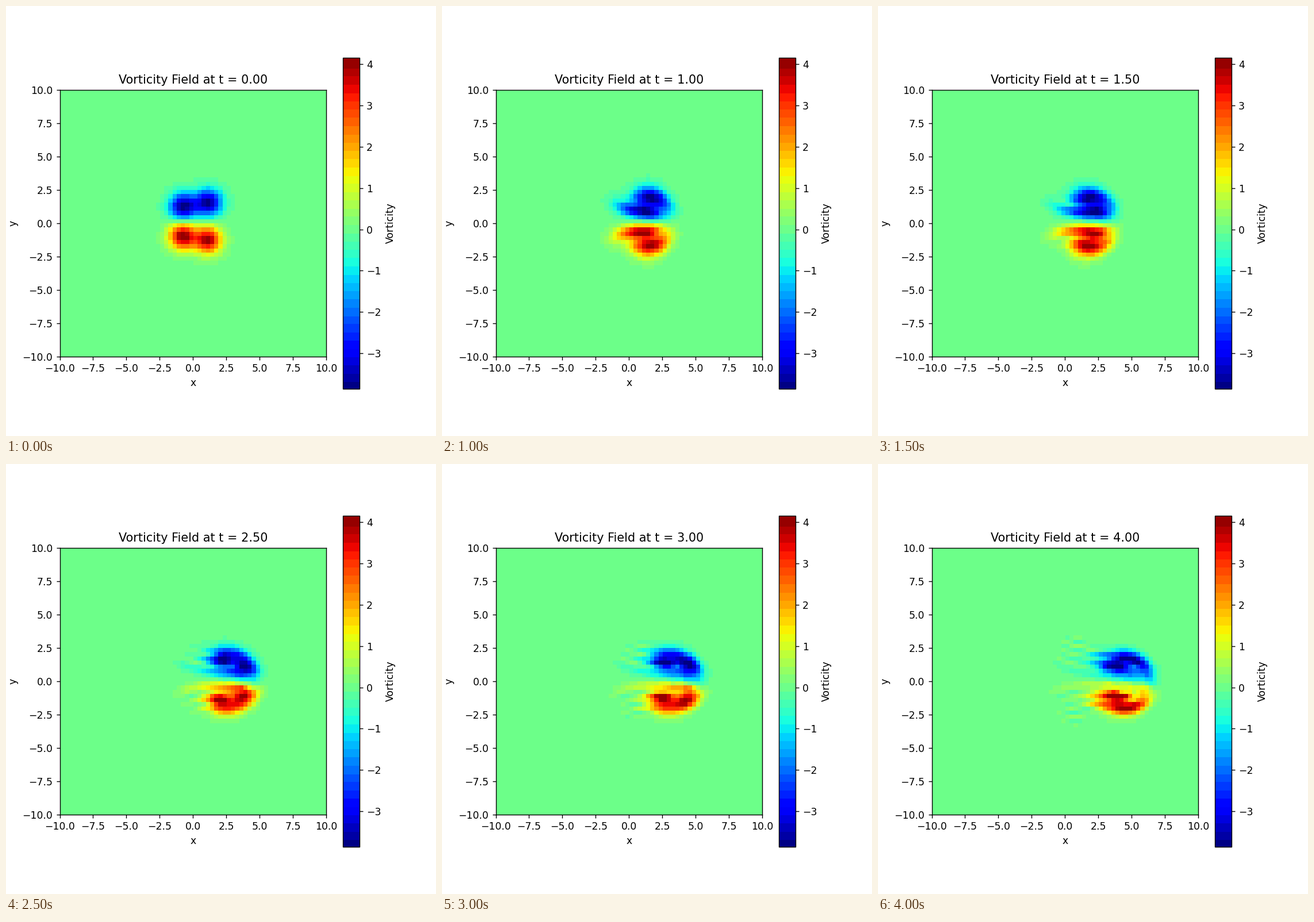
Write a matplotlib script that moves like this. It is 748 px wide and 748 px high and loops after 4500 ms.

```python
import numpy as np
import matplotlib.pyplot as plt
from matplotlib.animation import FuncAnimation
from matplotlib.colors import ListedColormap

N, HALF = 64, 10.0
H = 2 * HALF / N
VMIN, VMAX = -3.86, 4.16
STEP = 0.2                  # width of one colour band
FRAMES, FRAME_T, SUBSTEPS = 9, 0.5, 25
CORE = 1.0                  # squared core radius
NU = 0.001

# x, y, peak vorticity
VORTICES = [
    (-0.96, -1.10, 4.18),
    (0.95, -1.40, 3.92),
    (-0.92, 1.10, -3.92),
    (0.98, 1.40, -3.78),
]

axis = -HALF + H * np.arange(N)
X, Y = np.meshgrid(axis, axis)
k = 2 * np.pi * np.fft.fftfreq(N, H)
KX, KY = np.meshgrid(k, k)
K2 = KX**2 + KY**2
K2[0, 0] = 1.0


def diff(w, ax):
    return (np.roll(w, -1, ax) - np.roll(w, 1, ax)) / (2 * H)


def laplacian(w):
    near = sum(np.roll(w, s, ax) for s in (-1, 1) for ax in (0, 1))
    return (near - 4 * w) / H**2


def rate(w):
    psi = -np.fft.fft2(w) / K2
    psi[0, 0] = 0
    u = np.fft.ifft2(1j * KY * psi).real
    v = -np.fft.ifft2(1j * KX * psi).real
    return NU * laplacian(w) - u * diff(w, 1) - v * diff(w, 0)


def advance(w, dt):
    a = rate(w)
    b = rate(w + dt / 2 * a)
    c = rate(w + dt / 2 * b)
    d = rate(w + dt * c)
    return w + dt / 6 * (a + 2 * b + 2 * c + d)


def simulate():
    w = sum(a * np.exp(-((X - x)**2 + (Y - y)**2) / CORE)
            for x, y, a in VORTICES)
    fields = [w]
    for _ in range(FRAMES - 1):
        for _ in range(SUBSTEPS):
            w = advance(w, FRAME_T / SUBSTEPS)
        fields.append(w)
    return fields


def banded_jet(n=512):
    values = VMIN + (np.arange(n) + 0.5) / n * (VMAX - VMIN)
    bands = np.clip(np.round(values / STEP), -19, 20) * STEP
    return ListedColormap(plt.get_cmap("jet")((bands - VMIN) / (VMAX - VMIN)))


fields = simulate()

plt.rcParams["font.family"] = "DejaVu Sans"
fig, ax = plt.subplots(figsize=(6, 6), dpi=748 / 6)
image = ax.imshow(fields[0], origin="lower", cmap=banded_jet(),
                  extent=[-HALF, HALF, -HALF, HALF],
                  vmin=VMIN, vmax=VMAX, interpolation="nearest")
fig.colorbar(image, ax=ax, label="Vorticity")
ticks = np.arange(-10, 10.1, 2.5)
ax.set_xticks(ticks)
ax.set_yticks(ticks)
ax.set_xlabel("x")
ax.set_ylabel("y")
title = ax.set_title("Vorticity Field at t = 0.00")


def update(i):
    image.set_data(fields[i])
    title.set_text(f"Vorticity Field at t = {i * FRAME_T:.2f}")
    return image, title


anim = FuncAnimation(fig, update, frames=FRAMES, interval=500,
                     repeat=True, repeat_delay=0, blit=False)
plt.show()
```
